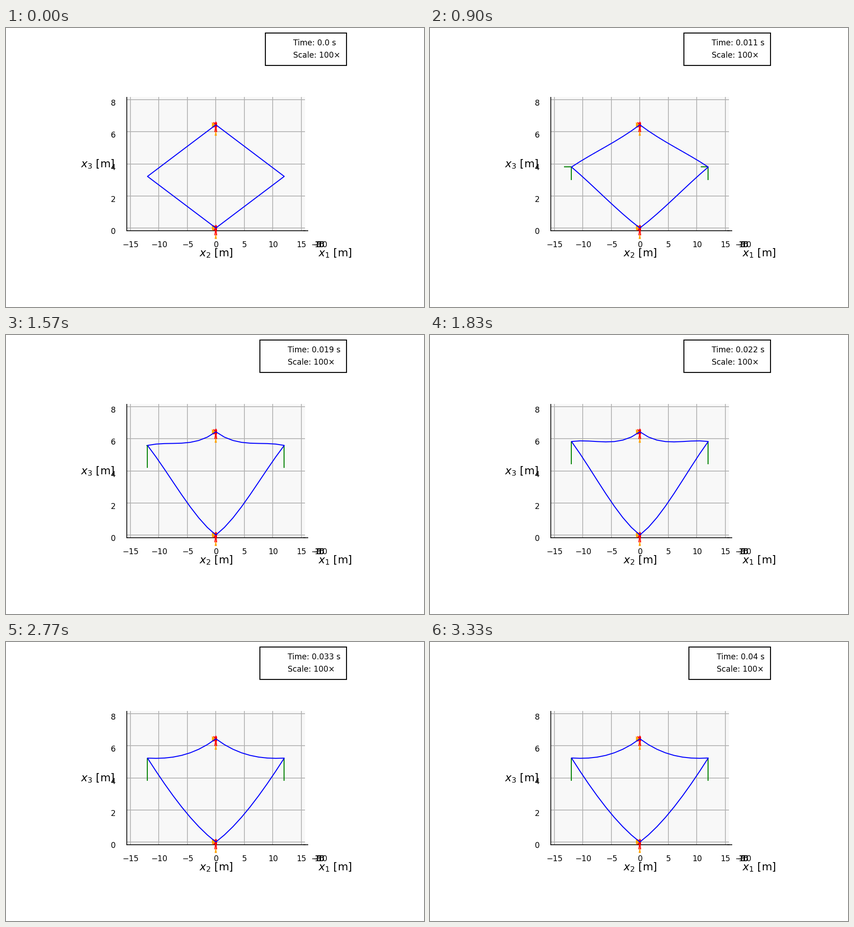
Write a matplotlib script that moves like this. It is 917 px wide and 611 px high and loops after 3.36 s.

```python
import math
import numpy as np
import matplotlib.pyplot as plt
from matplotlib.animation import FuncAnimation
from matplotlib.lines import Line2D
from matplotlib.patches import Polygon, Rectangle

W, H, DPI = 917, 611, 100
PT = 72 / DPI                # points per pixel
THIN, LINE = 1.7 * PT, 2.12 * PT
SMALL, LARGE = 16.98 * PT, 23.35 * PT

X0, Z0 = 460.4, 438.0        # pixel position of the data origin
SX, SZ = 12.5, 35.12         # pixels per metre
TOP = 212.0                  # upper support
HALF = 150.0                 # half span in pixels
RISE = (Z0 - TOP) / 2

STEP = 0.0004                # simulated seconds per step
RAMP = 0.02                  # load ramp duration

# Step, tip lift, lift rate, bending, bending rate
KEYS = np.array([
    [0, 0, 0, 0, 0],
    [17, -3, 0.3, -4, 0.5],
    [37, 57.6, 3.0, 122, 5.0],
    [55, 91.8, 0.1, 183.6, -0.8],
    [68, 77.6, -0.85, 124, -3.2],
    [83, 70.7, -0.1, 91.2, -0.5],
    [100, 71, 0, 90, 0],
])

fig = plt.figure(figsize=(W / DPI, H / DPI), dpi=DPI, facecolor="white")
ax = fig.add_axes([0, 0, 1, 1])
ax.set_xlim(0, W)
ax.set_ylim(H, 0)
ax.axis("off")
plt.rcParams["font.family"] = "DejaVu Sans"


def stroke(xs, ys, color, width=LINE, z=3):
    line, = ax.plot(xs, ys, color=color, lw=width, zorder=z,
                    solid_capstyle="butt", solid_joinstyle="round")
    return line


def label(x, y, text, size=SMALL):
    ax.text(x, y, text, fontsize=size, ha="center", va="baseline", zorder=2)


def draw_axes():
    left, right, top, bottom = 265, 656, 150.5, 444
    ax.add_patch(Rectangle((left, top), right - left, bottom - top,
                           fc="#f8f8f8", ec="none", zorder=0))
    for v in range(-15, 16, 5):
        x = X0 + SX * v
        stroke([x, x], [top, bottom], "#b0b0b0", THIN, 1)
        label(x + 0.4, 480.2, str(v).replace("-", "\u2212"))
    for v in range(0, 9, 2):
        z = Z0 - SZ * v
        stroke([left, right], [z, z], "#b0b0b0", THIN, 1)
        label(235, z + 13.2, str(v))
    for v in range(-10, 11, 5):
        label(686.7, 480.2, str(v).replace("-", "\u2212"))
    stroke([left, left], [top, bottom + 0.8], "black", THIN, 2)
    stroke([left, right + 1], [bottom, bottom], "black", THIN, 2)
    stroke([652, 662.5], [bottom - 0.2, bottom - 0.2], "black", THIN, 2)
    label(461, 499.7, "$x_2$ [m]", LARGE)
    label(722, 499.7, "$x_1$ [m]", LARGE)
    label(200.5, 304.7, "$x_3$ [m]", LARGE)


def draw_support(y):
    """Arrowheads of the reaction forces (red) and moments (orange)."""
    x = X0 - 0.2
    for points in ([(-8.4, -6), (-8.4, 6), (-1, 0)],
                   [(0, 12), (-2.5, 24), (2.5, 24)]):
        ax.add_patch(Polygon([(x + dx, y + dy) for dx, dy in points],
                             fc="orange", ec="none", zorder=3))
    stroke([x - 5, x, x - 5], [y - 5.5, y, y + 5.5], "red")
    stroke([x - 2, x, x + 2], [y + 16, y + 1, y + 16], "red")
    stroke([x - 0.6, x - 0.6], [y - 7, y + 6], "red", 3 * PT)
    stroke([x, x], [y - 5.5, y + 5], "red", 5 * PT)


def hermite(k, col):
    """Smooth value at step k from the keyed values and rates."""
    i = min(np.searchsorted(KEYS[:, 0], k, side="right") - 1, len(KEYS) - 2)
    a, b = KEYS[i], KEYS[i + 1]
    span = b[0] - a[0]
    u = (k - a[0]) / span
    ease = u * u * (3 - 2 * u)
    return (a[col] * (1 - ease) + b[col] * ease
            + span * u * (1 - u) * ((1 - u) * a[col + 1] - u * b[col + 1]))


draw_axes()
draw_support(TOP)
draw_support(Z0)

s = np.linspace(0, 1, 9)
frame_line = stroke([], [], "blue", z=4)
tips = (X0 - HALF, X0 + HALF)
v_loads = [stroke([], [], "green") for _ in tips]
h_loads = [stroke([], [], "green") for _ in tips]

blank = [Line2D([], [], linestyle="none") for _ in range(2)]
legend = ax.legend(blank, ["Time: 0.0 s", "Scale: 100\u00d7"],
                   loc="upper right", bbox_to_anchor=(747.3, 10.7),
                   bbox_transform=ax.transData, borderaxespad=0,
                   borderpad=0.8, fontsize=SMALL, fancybox=False,
                   framealpha=1, edgecolor="black")
legend.get_frame().set_linewidth(LINE)
clock = legend.get_texts()[0]


def update(tick):
    k = (6 * tick + 3) // 20         # 30 steps per second on a 10 ms clock
    t = k * STEP
    lift, bend = hermite(k, 1), hermite(k, 3)

    shift = lift * s**3 + bend * s**2 * (1 - s)
    upper = TOP + RISE * s - shift
    lower = Z0 - RISE * s - shift
    right, left = X0 + HALF * s, X0 - HALF * s
    frame_line.set_data(
        np.concatenate([right, right[::-1], left, left[::-1]]),
        np.concatenate([upper, lower[::-1], lower, upper[::-1]]))

    tip_y = upper[-1]
    push = 50 * math.sin(math.pi / 2 * min(1, t / RAMP))**2
    side = 17.5 * max(0, 1 - abs(2 * t / RAMP - 1))
    for x, v, h in zip(tips, v_loads, h_loads):
        v.set_data([x, x], [tip_y, tip_y + push])
        h.set_data([x - side, x], [tip_y, tip_y])
        v.set_visible(push > 0.01)
        h.set_visible(side > 0.01)

    clock.set_text(f"Time: {float(f'{t:.2g}')} s")
    return [frame_line, *v_loads, *h_loads, legend]


anim = FuncAnimation(fig, update, frames=336, interval=10,
                     repeat=True, repeat_delay=0, blit=False)
plt.show()
```
